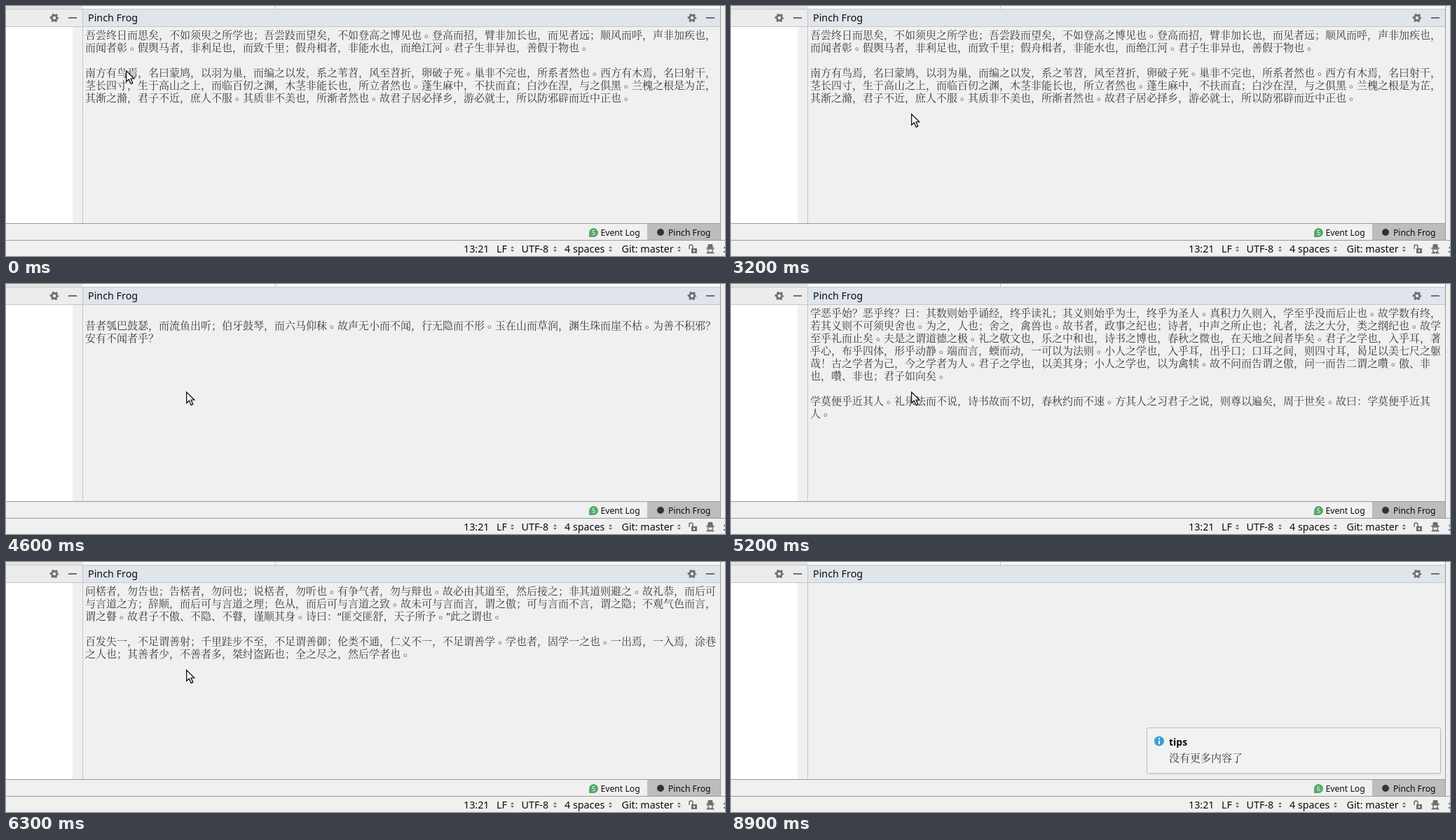
An HTML page that plays this animation: 1026x358 px, repeating every 9100 ms.

```html
<!DOCTYPE html>
<html lang="zh-CN">
<head>
<meta charset="utf-8">
<title>Reader panel</title>
<style>
html, body { margin: 0; width: 100%; height: 100%; overflow: hidden; background: #f0f0f0; }
#stage { position: relative; width: 1026px; height: 358px; overflow: hidden; }
svg { position: absolute; left: 0; top: 0; display: block; }
svg text { font: 14.3px "Noto Sans", "Open Sans", sans-serif; fill: #0c0c0c; white-space: pre; }
svg .tab { font-size: 12.2px; }
.han, svg .han { font: 15px/18px "Noto Sans", "Noto Serif CJK SC", "Noto Sans CJK SC", serif; }
.han { color: #383838; fill: #383838; }
#page { position: absolute; left: 113px; top: 32px; width: 904px; white-space: pre-wrap; line-break: normal; text-spacing-trim: space-all; }
#page i { position: relative; left: 4px; top: -3px; font-style: normal; }
</style>
</head>
<body>
<div id="stage">
  <svg width="1026" height="358" viewBox="0 0 1026 358">
    <defs>
      <g id="gear" fill="none" stroke="#6e6e6e">
        <circle r="3.6" stroke-width="2.6"/>
        <circle r="5.4" stroke-width="2" stroke-dasharray="2.83 2.83" stroke-dashoffset="1.4"/>
      </g>
      <path id="updown" d="M-2.5 -1L0 -4L2.5 -1ZM-2.5 1L0 4L2.5 1Z" fill="#6a6a6a"/>
    </defs>

    <rect width="1026" height="358" fill="#f0f0f0"/>
    <rect width="109" height="4" fill="#e4e4e4"/>
    <rect x="110" width="909" height="4" fill="#fafafa"/>
    <rect x="384" width="1" height="4" fill="#c4c4c4"/>
    <rect y="5" width="109" height="24" fill="#ececec"/>
    <rect x="110" y="5" width="909" height="24" fill="#dfe5eb"/>
    <rect y="30" width="95" height="281" fill="#fff"/>
    <path d="M0 4.5H1019M0 29.5H1019M109.5 4V311" stroke="#c6c6c6"/>
    <rect x="915" y="312" width="104" height="23" fill="#bdbdbd"/>
    <path d="M0 311.5H1019M0 335.5H1026M1019.5 0V335" stroke="#999"/>

    <use href="#gear" x="69" y="17"/>
    <use href="#gear" x="979" y="17"/>
    <path d="M89 17H101M999 17H1011" stroke="#6e6e6e" stroke-width="2"/>
    <text x="117" y="22">Pinch Frog</text>

    <path d="M832 331V324.5A6.5 6.5 0 1 1 838.5 331Z" fill="#59a869"/>
    <text id="count" x="838.5" y="328" text-anchor="middle" style="font-size:9px;fill:#fff">5</text>
    <text class="tab" x="848.5" y="329">Event Log</text>
    <circle cx="934" cy="324" r="5" fill="#333"/>
    <text class="tab" x="945" y="329">Pinch Frog</text>

    <text x="653" y="353">13:21</text>
    <text x="700" y="353">LF</text>
    <text x="735.5" y="353">UTF-8</text>
    <text x="797" y="353">4 spaces</text>
    <text x="878.5" y="353">Git: master</text>
    <use href="#updown" x="722.5" y="348"/>
    <use href="#updown" x="783.5" y="348"/>
    <use href="#updown" x="862.5" y="348"/>
    <use href="#updown" x="960.5" y="348"/>

    <path d="M975 348V344.5A2.5 2.5 0 0 1 980 344.5V347" fill="none" stroke="#6e6e6e" stroke-width="1.5"/>
    <path d="M978 347H986V354H978Z" fill="#6e6e6e"/>
    <path d="M981 349H983V352H981Z" fill="#f0f0f0"/>
    <path d="M1001 346L1002 341H1008L1009 346H1011V347.5H999V346Z" fill="#6e6e6e"/>
    <path d="M1001.5 348H1008.5V350Q1008 353 1005 353Q1002 353 1001.5 350Z" fill="none" stroke="#6e6e6e" stroke-width="1.3"/>
    <path d="M999 354.5Q1000 352 1002 352L1005 354L1008 352Q1010 352 1011 354.5Z" fill="#6e6e6e"/>
    <path d="M1024 346L1026 344V348ZM1024 351H1026V353H1024Z" fill="#3a67c8"/>

    <g id="tip">
      <rect x="593" y="239" width="421" height="66" rx="3" fill="#000" opacity=".05"/>
      <rect x="593.5" y="237.5" width="419" height="65" rx="2" fill="#f2f2f2" stroke="#bdbdbd"/>
      <circle cx="611" cy="256.500" r="7" fill="#389fd6"/>
      <path d="M611 252V254M611 255.500V261" stroke="#fff" stroke-width="2"/>
      <text x="625" y="263" style="font-weight:bold;font-size:14px">tips</text>
      <text class="han" x="625" y="286">没有更多内容了</text>
    </g>
  </svg>

  <div id="page" class="han"></div>

  <svg width="1026" height="358" viewBox="0 0 1026 358">
    <path id="cursor" d="M.7 .9V16.300L4.300 13L7.200 19.400L9.800 18.200L7 12H11.800Z" fill="#fff" stroke="#000" stroke-width="1.2"/>
  </svg>
</div>

<script>
const LOOP = 9100;

const pages = [
`吾尝终日而思矣，不如须臾之所学也；吾尝跂而望矣，不如登高之博见也。登高而招，臂非加长也，而见者远；顺风而呼，声非加疾也，
而闻者彰。假舆马者，非利足也，而致千里；假舟楫者，非能水也，而绝江河。君子生非异也，善假于物也。

南方有鸟焉，名曰蒙鸠，以羽为巢，而编之以发，系之苇苕，风至苕折，卵破子死。巢非不完也，所系者然也。西方有木焉，名曰射干，
茎长四寸，生于高山之上，而临百仞之渊，木茎非能长也，所立者然也。蓬生麻中，不扶而直；白沙在涅，与之俱黑。兰槐之根是为芷，
其渐之滫，君子不近，庶人不服。其质非不美也，所渐者然也。故君子居必择乡，游必就士，所以防邪辟而近中正也。`,
`
故不登高山，不知天之高也；不临深溪，不知地之厚也；不闻先王之遗言，不知学问之大也。干、越、夷、貉之子，生而同声，长而异
俗，教使之然也。诗曰：“嗟尔君子，无恒安息。靖共尔位，好是正直。神之听之，介尔景福。”神莫大于化道，福莫长于无祸。（此段教
材无）`,
`
物类之起，必有所始。荣辱之来，必象其德。肉腐出虫，鱼枯生蠹。怠慢忘身，祸灾乃作。强自取柱，柔自取束。邪秽在身，怨之所构。
施薪若一，火就燥也，平地若一，水就湿也。草木畴生，禽兽群焉，物各从其类也。是故质的张，而弓矢至焉；林木茂，而斧斤至焉；树
成荫，而众鸟息焉。醯酸，而蚋聚焉。故言有招祸也，行有招辱也，君子慎其所立乎！（此段教材无）`,
`积土成山，风雨兴焉；积水成渊，蛟龙生焉；积善成德，而神明自得，圣心备焉。故不积跬步，无以至千里；不积小流，无以成江海。骐骥一跃，不能十步；驽马十驾，功在不舍。锲而舍之，朽木不折；锲而不舍，金石可镂。蚓无爪牙之利，筋骨之强，上食埃土，下饮黄泉，用心一也。蟹六跪而二螯，非蛇鳝之穴无可寄托者，用心躁也。

是故无冥冥之志者，无昭昭之明；无惛惛之事者，无赫赫之功。行衢道者不至，事两君者不容。目不能两视而明，耳不能两听而聪。螣蛇无足而飞，鼫鼠五技而穷。诗曰：“尸鸠在桑，其子七兮。淑人君子，其仪一兮。其仪一兮，心如结兮。”故君子结于一也。`,
`
昔者瓠巴鼓瑟，而流鱼出听；伯牙鼓琴，而六马仰秣。故声无小而不闻，行无隐而不形。玉在山而草润，渊生珠而崖不枯。为善不积邪？
安有不闻者乎？`,
`学恶乎始？恶乎终？曰：其数则始乎诵经，终乎读礼；其义则始乎为士，终乎为圣人。真积力久则入，学至乎没而后止也。故学数有终，若其义则不可须臾舍也。为之，人也；舍之，禽兽也。故书者，政事之纪也；诗者，中声之所止也；礼者，法之大分，类之纲纪也。故学至乎礼而止矣。夫是之谓道德之极。礼之敬文也，乐之中和也，诗书之博也，春秋之微也，在天地之间者毕矣。君子之学也，入乎耳，著乎心，布乎四体，形乎动静。端而言，蝡而动，一可以为法则。小人之学也，入乎耳，出乎口；口耳之间，则四寸耳，曷足以美七尺之躯哉！古之学者为己，今之学者为人。君子之学也，以美其身；小人之学也，以为禽犊。故不问而告谓之傲，问一而告二谓之囋。傲、非也，囋、非也；君子如向矣。

学莫便乎近其人。礼乐法而不说，诗书故而不切，春秋约而不速。方其人之习君子之说，则尊以遍矣，周于世矣。故曰：学莫便乎近其人。`,
`
学之经莫速乎好其人，隆礼次之。上不能好其人，下不能隆礼，安特将学杂识志，顺诗书而已耳。则末世穷年，不免为陋儒而已。将原先
王，本仁义，则礼正其经纬蹊径也。若挈裘领，诎五指而顿之，顺者不可胜数也。不道礼宪，以诗书为之，譬之犹以指测河也，以戈舂黍
也，以锥餐壶也，不可以得之矣。故隆礼，虽未明，法士也；不隆礼，虽察辩，散儒也。`,
`问楛者，勿告也；告楛者，勿问也；说楛者，勿听也。有争气者，勿与辩也。故必由其道至，然后接之；非其道则避之。故礼恭，而后可与言道之方；辞顺，而后可与言道之理；色从，而后可与言道之致。故未可与言而言，谓之傲；可与言而不言，谓之隐；不观气色而言，谓之瞽。故君子不傲、不隐、不瞽，谨顺其身。诗曰：“匪交匪舒，天子所予。”此之谓也。

百发失一，不足谓善射；千里跬步不至，不足谓善御；伦类不通，仁义不一，不足谓善学。学也者，固学一之也。一出焉，一入焉，涂巷之人也；其善者少，不善者多，桀纣盗跖也；全之尽之，然后学者也。`
];

// [start ms, page index]; no index means an empty page with the tip
const turns = [[0, 0], [1700, 1], [3200, 0], [3700, 2], [4200, 3], [4600, 4], [5200, 5], [5800, 6], [6300, 7], [7000]];
// [start ms, x, y]; no position means hidden
const moves = [[0, 171, 92], [100], [500, 142, 131], [600, 257, 154], [8600, 238, 128], [8700, 190, 68], [8800, 129, 6], [8900]];

const el = id => document.getElementById(id);
const show = (node, on) => node.setAttribute('visibility', on ? 'visible' : 'hidden');
const at = (steps, t) => steps.findLast(s => s[0] <= t);
let turn, move;

function draw(t) {
  const nextTurn = at(turns, t), nextMove = at(moves, t);
  if (nextTurn !== turn) {
    turn = nextTurn;
    const text = pages[turn[1]];
    el('page').innerHTML = text ? text.replace(/。/g, '<i>。</i>') : '';
    el('count').textContent = text ? '5' : '6';
    show(el('tip'), !text);
  }
  if (nextMove !== move) {
    move = nextMove;
    const [, x, y] = move;
    show(el('cursor'), x !== undefined);
    if (x !== undefined) el('cursor').setAttribute('transform', `translate(${x} ${y})`);
  }
}

const start = performance.now();
function tick() {
  draw((performance.now() - start) % LOOP);
  requestAnimationFrame(tick);
}
draw(0);
tick();
</script>
</body>
</html>
```
